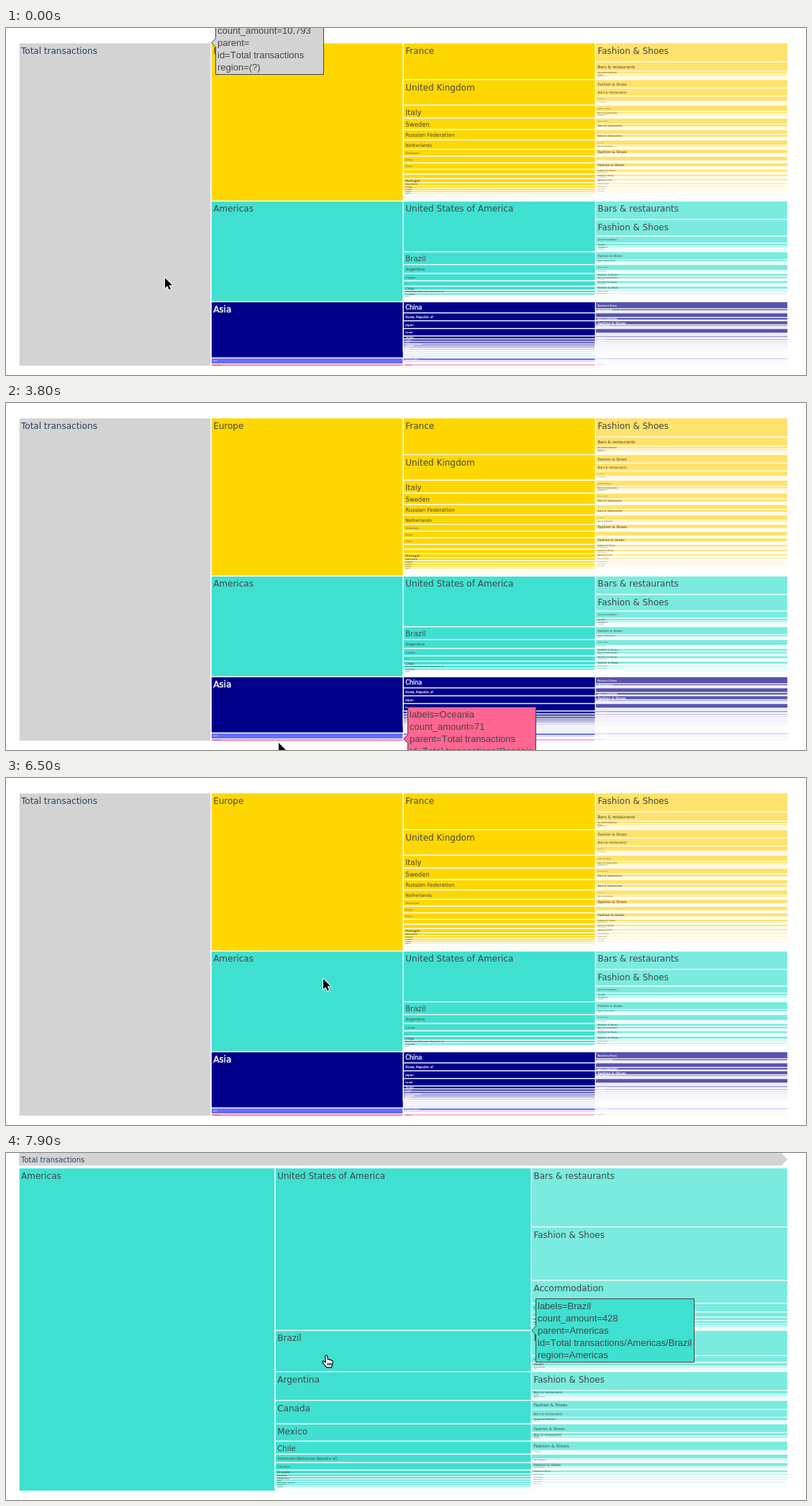
Animation, 1112 px wide and 482 px high, one loop 8000 ms. Source, as an HTML page with a canvas:

```html
<!DOCTYPE html>
<html lang="en">
<head>
<meta charset="utf-8">
<title>Total transactions</title>
<style>
  html, body { margin: 0; width: 100%; height: 100%; overflow: hidden; background: #fff; }
  canvas { display: block; }
</style>
</head>
<body>
<canvas id="stage" width="1112" height="482"></canvas>
<script>
const ctx = document.getElementById('stage').getContext('2d');
const LOOP = 8000, STEP = 100;
const LEFT = 18, TOP = 20.7, WIDTH = 1068.6, HEIGHT = 449, RIGHT = LEFT + WIDTH, BOTTOM = TOP + HEIGHT;
const ZOOM_START = 6533, ZOOM_TIME = 750;
const CATEGORIES = { F: 'Fashion & Shoes', B: 'Bars & restaurants', A: 'Accommodation', H: 'Health', T: 'Transportation' };

// Countries are "name:size category sizes", in the same unit as the region's total.
const REGIONS = [
  { name: 'Europe', count: 5282, color: '#ffd700', leaf: '#ffe26b', total: 219.8, countries:
    'France:51 F26.5 B12.5 A3.8 H2.4;United Kingdom:35.6 F11.8 B11 A7.3;Italy:18 F8.7 B3.4 A2;' +
    'Sweden:15.9 F8 B4.2;Russian Federation:14.4 F6.6 B4.2;Netherlands:13 F7.2 B2.6;' +
    'Switzerland:9.7 F5.8;Norway:9.2 F6.3;Finland:9 F5.3;Spain:6.7;Germany:6.2;Portugal:5.5;' +
    'Denmark:4.2;Poland:3.5;Austria:3;Ireland:2.7;Belgium:2.1;Greece:1.2;Czechia:1' },
  { name: 'Americas', count: 3363, color: '#40e0d0', leaf: '#7aebde', total: 449.2, countries:
    'United States of America:225.9 B82 F74.5 A31.7 H12 T7.4 A4.6;Brazil:57.2 F35 B9.6 H5;' +
    'Argentina:40 F26 B5 H2.5;Canada:32.6 F12.7 B11 A4.4;Mexico:24.2 F12.2 B4.8 H2.6;Chile:18 F13;' +
    'Venezuela (Bolivarian Republic of):11.7 F6.4 B2.2;Colombia:10.4 F5.4 B2;Ecuador:5.2 F3.4;' +
    'Panama:3.8;Costa Rica:3.5;Peru:3.1;Dominican Republic:2.9;Puerto Rico:2.6;Uruguay:2.2;Guatemala:1.6' },
  { name: 'Asia', count: 1877, color: '#00008b', leaf: '#5853ae', total: 78.1, countries:
    'China:15.4 F9.8 B2.6;Korea, Republic of:11 F6.5 B3.4;Japan:10.8 F5.6 B2;Israel:10.3 F6.5;' +
    'Turkey:4.2;Jordan:3.2;India:2.7;United Arab Emirates:2.4;Saudi Arabia:2.1;Thailand:1.9;Taiwan:1.7;Singapore:1.5;Qatar:1.4' },
  { name: 'Africa', count: 200, color: '#636efa', leaf: '#9299fc', total: 8.3, countries: 'South Africa:3.7;Egypt:2;Morocco:1.2' },
  { name: 'Oceania', count: 71, color: '#ff6692', leaf: '#ff94b3', total: 3, countries: 'Australia:2.3' }
];

const nodes = [];
const byName = {};

function addNode(name, depth, y0, y1, color, region, extra) {
  const node = { name, depth, y0, y1, color, fill: color, region, ...extra };
  nodes.push(node);
  return node;
}

function addCategories(country, leaf, size, list) {
  const { y0, y1, color, region } = country;
  const scale = (y1 - y0) / size;
  let y = y0;
  const add = (key, height) => addNode(CATEGORIES[key], 3, y, y += height, color, region, { fill: leaf });
  for (const item of list) add(item[0], item.slice(1) * scale);
  for (const key of 'AHT') add(key, (y1 - y) * 0.3);
  addNode('', 3, y, y1, color, region, { rest: true });
}

function buildTree() {
  byName.Total = addNode('Total transactions', 0, TOP, BOTTOM, '#d3d3d3', '(?)',
    { id: 'Total transactions', parent: '', count: '10,793' });
  let top = TOP;
  for (const { name, count, color, leaf, total, countries } of REGIONS) {
    const end = top + HEIGHT * count / 10793;
    const scale = (end - top) / total;
    byName[name] = addNode(name, 1, top, end, color, name,
      { id: 'Total transactions/' + name, parent: 'Total transactions', count });
    let y = top;
    for (const entry of countries.split(';')) {
      const [label, spec] = entry.split(':');
      const [size, ...list] = spec.split(' ');
      const country = addNode(label, 2, y, y += size * scale, color, name,
        { id: `Total transactions/${name}/${label}`, parent: name, count: 428 });
      byName[label] = country;
      addCategories(country, leaf, +size, list.length ? list : ['F' + size * 0.52, 'B' + size * 0.24]);
    }
    addNode('', 2, y, end, color, name, { rest: true });
    top = end;
  }
}
buildTree();

const clamp = (v, lo, hi) => Math.min(hi, Math.max(lo, v));
const mix = (a, b, p) => a + (b - a) * p;
const isDark = color => color === '#00008b' || color === '#636efa';
const inFocus = node => node.region === 'Americas';

// Rectangle of a node while zooming from the whole tree (p = 0) into the Americas (p = 1).
function rectOf(node, p) {
  const d = node.depth, focus = byName.Americas;
  const column = i => inFocus(node) ? LEFT + WIDTH / 3 * i : i < 1 ? LEFT : RIGHT;
  const zoomY = y => d ? clamp(TOP + (y - focus.y0) * HEIGHT / (focus.y1 - focus.y0), TOP, BOTTOM) : y;
  return {
    x0: mix(LEFT + WIDTH / 4 * d, column(d - 1), p),
    x1: mix(LEFT + WIDTH / 4 * (d + 1), column(d), p),
    y0: mix(node.y0, zoomY(node.y0), p),
    y1: mix(node.y1, zoomY(node.y1), p)
  };
}

function drawBox(node, { x0, x1, y0, y1 }) {
  ctx.globalAlpha = node.rest ? 0.05 : 1;
  ctx.fillStyle = node.fill;
  ctx.fillRect(x0, y0, x1 - x0, y1 - y0);
  if (!node.rest) {
    ctx.globalAlpha = node.depth === 3 ? 0.8 : 1;
    ctx.strokeStyle = '#fff';
    ctx.lineWidth = 1.3;
    ctx.strokeRect(x0, y0, x1 - x0, y1 - y0);
  }
  ctx.globalAlpha = 1;
}

// White text gets a hairline outline, which makes it look slightly bolder.
function drawText(text, x, y, ink, size) {
  ctx.fillStyle = ink;
  ctx.fillText(text, x, y);
  if (ink !== '#fff') return;
  ctx.strokeStyle = ink;
  ctx.lineWidth = size / 30;
  ctx.strokeText(text, x, y);
}

function drawLabel(node, { x0, y0, y1 }) {
  const h = y1 - y0, pad = h > 6 ? 3 : 0;
  const size = Math.min(12, (h - 2 * pad) * 6 / 7);
  if (size < 1) return;
  ctx.font = `${size}px "DejaVu Sans", sans-serif`;
  const ink = isDark(node.color) ? '#fff' : node.depth ? '#444' : '#2a3f5f';
  drawText(node.name, x0 + 3, y0 + pad + size, ink, size);
}

function polygon(points, fill, stroke) {
  ctx.beginPath();
  for (const [x, y] of points) ctx.lineTo(x, y);
  ctx.closePath();
  ctx.fillStyle = fill;
  ctx.fill();
  if (!stroke) return;
  ctx.strokeStyle = stroke;
  ctx.lineWidth = 1;
  ctx.stroke();
}

function drawPathBar(p) {
  const x = mix(RIGHT, LEFT, p), size = 10 * p;
  ctx.save();
  ctx.beginPath();
  ctx.rect(LEFT, 0, WIDTH, 20);
  ctx.clip();
  polygon([[x - 8.5, 0], [RIGHT - 9, 0], [RIGHT - 0.5, 9], [RIGHT - 9, 17.5], [x - 8.5, 17.5], [x, 9]], '#d3d3d3');
  ctx.font = `${size}px "DejaVu Sans", sans-serif`;
  drawText('Total transactions', x + 1 + 2 * p, 3 + size, '#2a3f5f', size);
  ctx.restore();
}

function drawTooltip(node, p) {
  const rect = rectOf(node, p);
  const tipX = Math.floor(rect.x1) + 0.5, tipY = Math.floor(rect.y0) + 0.5;
  const lines = [
    'labels=' + node.name, 'count_amount=' + node.count, 'parent=' + node.parent,
    'id=' + node.id, 'region=' + node.region
  ];
  ctx.save();
  ctx.font = '13px "Liberation Sans", Arial, sans-serif';
  ctx.fontKerning = 'none';
  const width = Math.round(Math.max(...lines.map(s => ctx.measureText(s).width)) + 6);
  const x = tipX + 6, ink = isDark(node.color) ? '#fff' : '#444';
  polygon([[tipX, tipY], [x, tipY - 6], [x, tipY - 44], [x + width, tipY - 44],
    [x + width, tipY + 44], [x, tipY + 44], [x, tipY + 6]], node.color, ink);
  lines.forEach((s, i) => drawText(s, x + 2.5, tipY + 4.5 + (i - 2) * 17, ink, 13));
  ctx.restore();
}

const ARROW = new Path2D('M0 0V14.2L3.3 11.2L5.6 16.6L8 15.6L5.7 10.3H10.2Z');
const HAND = new Path2D('M-1.6 1Q0-1 1.6 1L2.4 6Q4 4.8 5 6.4Q7 5.8 7.5 7.4Q9.3 7 9.3 9L8.8 12.5L7.5 16.8H.5' +
  'L-3.6 11.5Q-6 8.8-4.4 8Q-2.5 7.8-.6 10ZM2.5 10.5V14M4.6 10.5V14M6.7 10.5V14');

// Pointer path: [time, x, y]
const POINTER = [
  [0, 221, 347], [600, 288, 215], [1000, 318, 205], [1200, 320, 241], [2000, 340, 320], [2600, 365, 400],
  [3100, 379, 459], [3500, 379, 468], [3800, 379, 472], [4000, 379, 468], [4600, 395, 400], [5000, 410, 235],
  [5400, 423, 133], [5500, 423, 133], [6400, 441, 279], [7400, 441, 279], [7600, 445, 281], [LOOP, 445, 281]
];
const HOVERS = [
  [0, 'Total'], [600, 'Europe'], [1300, 'Americas'], [2500, 'Asia'], [3200, 'Africa'], [3500, 'Oceania'], [3900, ''],
  [4100, 'Asia'], [4700, 'Americas'], [5000, 'Europe'], [6200, 'Americas'], [6500, ''], [7900, 'Brazil']
];
const ARROW_TIMES = [[0, 600], [3600, 4100], [6500, 7500]];

function drawPointer(t) {
  const i = POINTER.findIndex(k => k[0] > t);
  const [t0, x0, y0] = POINTER[i - 1], [t1, x1, y1] = POINTER[i];
  const p = (t - t0) / (t1 - t0);
  const arrow = ARROW_TIMES.some(([from, to]) => t >= from && t < to);
  ctx.save();
  ctx.translate(mix(x0, x1, p), mix(y0, y1, p));
  ctx.lineJoin = 'round';
  ctx.lineWidth = arrow ? 2 : 1.2;
  ctx.strokeStyle = arrow ? '#fff' : '#000';
  ctx.fillStyle = arrow ? '#000' : '#fff';
  if (arrow) {
    ctx.stroke(ARROW);
    ctx.fill(ARROW);
  } else {
    ctx.fill(HAND);
    ctx.stroke(HAND);
  }
  ctx.restore();
}

function draw(now) {
  const t = Math.floor(now % LOOP / STEP) * STEP;
  const p = clamp((t - ZOOM_START) / ZOOM_TIME, 0, 1);
  ctx.fillStyle = '#fff';
  ctx.fillRect(0, 0, 1112, 482);

  const visible = p < 1 ? nodes : nodes.filter(inFocus);
  for (const node of visible) drawBox(node, rectOf(node, p));
  for (const node of visible) if (p === 0 || inFocus(node)) drawLabel(node, rectOf(node, p));
  if (p > 0) drawPathBar(p);

  const hovered = HOVERS.filter(h => h[0] <= t).pop()[1];
  if (hovered) drawTooltip(byName[hovered], p);
  drawPointer(t);
}

const start = performance.now();
function tick() {
  draw(performance.now() - start);
  requestAnimationFrame(tick);
}
tick();
</script>
</body>
</html>
```
